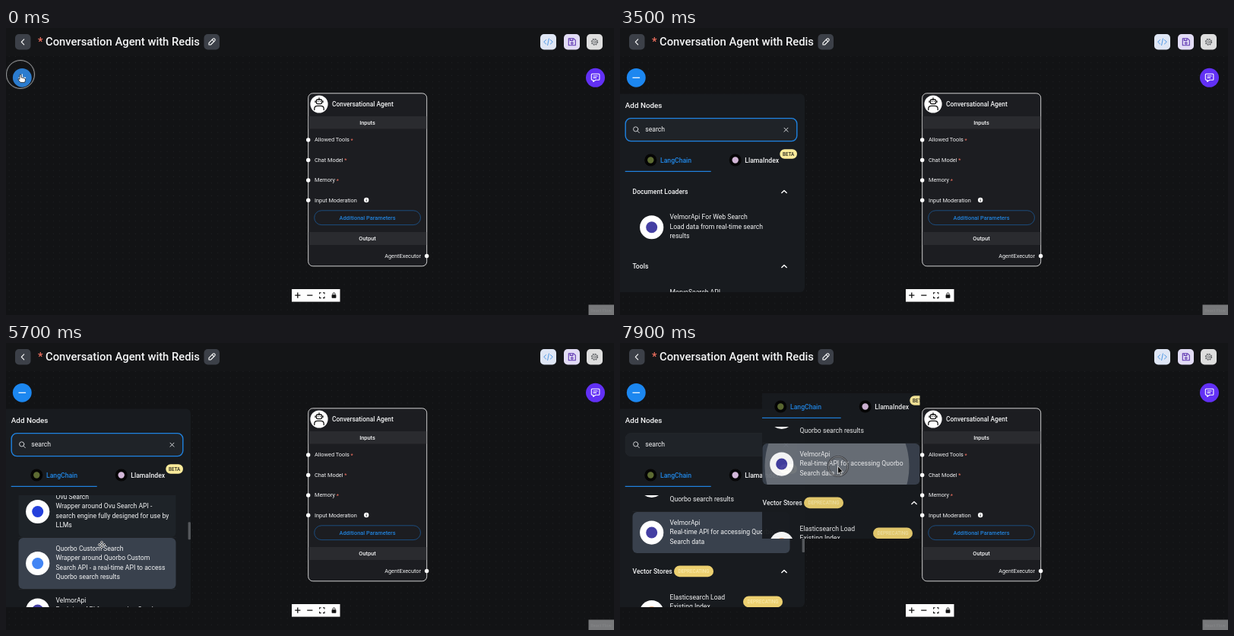
These frames come from a looping animation (800 by 377 pixels, 8000 ms). An HTML page:

```html
<!DOCTYPE html>
<html lang="en">
<head>
<meta charset="utf-8">
<title>Add a search tool to the agent</title>
<style>
  html, body { margin: 0; width: 100%; height: 100%; overflow: hidden; background: #141517; }
  svg { display: block; width: 100vw; height: 100vh; }
  text { font: 400 8.63px Roboto, "Open Sans", sans-serif; fill: #f4f5f6; dominant-baseline: central; white-space: pre; }
  .title { font-size: 14.8px; font-weight: 500; }
  .drawer { font-size: 9.86px; font-weight: 500; }
  .head { font-weight: 500; }
  .active { font-weight: 500; fill: #2189ea; }
  .hint { fill: #85888c; }
  .name { font-size: 8.4px; font-weight: 500; }
  .port { font-size: 7.35px; }
  .sect { font-size: 7.4px; font-weight: 500; text-anchor: middle; }
  .link { fill: #2182dc; }
  .red { fill: #f0705f; }
  .beta { font-size: 6.3px; font-weight: 500; fill: #2b2a20; text-anchor: middle; }
  .chip { font-size: 6.3px; fill: #fbeeb4; text-anchor: middle; }
  .ln { fill: none; stroke: #fff; stroke-width: 1.1; stroke-linecap: round; stroke-linejoin: round; }
</style>
</head>
<body>
<svg id="stage" viewBox="0 0 800 377" preserveAspectRatio="none">
  <defs>
    <pattern id="dots" width="8.32" height="8.32" patternUnits="userSpaceOnUse">
      <circle cx="4" cy="4" r=".45" fill="#303135"/>
    </pattern>
    <clipPath id="listClip"><rect y="200" width="239" height="147"/></clipPath>
    <clipPath id="itemClip"><rect x="16.5" y="-14" width="207" height="54" rx="6"/></clipPath>
    <clipPath id="ghostClip"><rect x="16" y="156" width="207.5" height="191"/></clipPath>
  </defs>

  <rect width="800" height="377" fill="#121315"/>
  <rect y="37" width="800" height="340" fill="url(#dots)"/>
  <rect width="800" height="37" fill="#141517"/>

  <!-- header -->
  <rect x="12" y="8" width="20.5" height="20.5" rx="5" fill="#3c4048"/>
  <path class="ln" d="M23.7 14.8l-3.4 3.5 3.4 3.5"/>
  <text class="title" x="42" y="17.7"><tspan class="red">*</tspan></text>
  <text class="title" x="52" y="17.7">Conversation Agent with Redis</text>
  <rect x="260.5" y="8" width="20.5" height="20.5" rx="5" fill="#3c4048"/>
  <path class="ln" d="M267 22v-2.4l5.4-5.4q1.2-1 2.3.1t.1 2.3l-5.4 5.4zM271.3 15.4l2.4 2.4"/>
  <rect x="703" y="8" width="21" height="20.5" rx="5" fill="#dfe6f5"/>
  <path class="ln" style="stroke:#3f90e2;stroke-width:.9" d="M710.6 15.6l-2.9 2.7 2.9 2.7M716.4 15.6l2.9 2.7-2.9 2.7M714.4 14l-1.8 8.6"/>
  <rect x="734" y="8" width="21" height="20.5" rx="5" fill="#e2dcf5"/>
  <path class="ln" style="stroke:#5e35b1" d="M740.3 13.8h6.6l2.4 2.4v6.6h-9zM742.3 13.8v2.6h3.6v-2.6"/>
  <circle class="ln" style="stroke:#5e35b1" cx="744.8" cy="19.8" r="1.3"/>
  <rect x="764" y="8" width="21" height="20.5" rx="5" fill="#dedede"/>
  <circle class="ln" style="stroke:#66686b;stroke-width:1.2;stroke-linecap:butt;stroke-dasharray:1.6 1.62" cx="774.5" cy="18.3" r="4.1"/>
  <circle class="ln" style="stroke:#66686b;stroke-width:.9" cx="774.5" cy="18.3" r="3.4"/>
  <circle class="ln" style="stroke:#66686b;stroke-width:.9" cx="774.5" cy="18.3" r="1.4"/>

  <!-- chat button -->
  <circle cx="775.5" cy="65.3" r="12.5" fill="#6230f5"/>
  <path class="ln" d="M770.3 61.2q0-1 1-1h8.6q1 0 1 1v6q0 1-1 1h-4.2l-3 2.3v-2.3h-1.4q-1 0-1-1zM773 63h5.2M773 65.4h3.6"/>

  <!-- agent node -->
  <rect x="397.7" y="85.8" width="156" height="227" rx="6" fill="#1c1d21" stroke="#e4e4e4" stroke-width=".9"/>
  <circle cx="412" cy="100" r="11.6" fill="#fff"/>
  <g class="ln" style="stroke:#111;stroke-width:1.3">
    <rect x="408.4" y="94" width="7.2" height="5.6" rx="1.6"/>
    <path d="M412 92v2M407 96v1.6M417 96v1.6M405.8 107.5v-1.4q0-3.8 4-3.8h4.4q4 0 4 3.8v1.4M410.6 96.6h.1M413.4 96.6h.1"/>
  </g>
  <text class="name" x="429" y="100.2">Conversational Agent</text>
  <rect x="398.2" y="116" width="155" height="16.5" fill="#2a2b2f"/>
  <text class="sect" x="475.5" y="124">Inputs</text>
  <g id="ports"></g>
  <circle cx="474.2" cy="226" r="3.2" fill="#fff"/>
  <path d="M474.2 225.6v2.2M474.2 224v.5" stroke="#1c1d21"/>
  <rect x="405.7" y="239.8" width="139.8" height="18.8" rx="9.4" fill="none" stroke="#1c5288" stroke-width=".9"/>
  <text class="sect link" x="475.5" y="249">Additional Parameters</text>
  <rect x="398.2" y="268" width="155" height="17" fill="#2a2b2f"/>
  <text class="sect" x="475.5" y="276.7">Output</text>
  <text class="port" x="546" y="299.5" text-anchor="end">AgentExecutor</text>
  <circle cx="553.6" cy="299.5" r="2.7" fill="#fff"/>

  <!-- canvas controls -->
  <rect x="376" y="343" width="63.5" height="16.6" fill="#fefefe"/>
  <path d="M380.2 351.2h7.2M383.8 347.6v7.2M396.2 351.2h7.2" stroke="#111" stroke-width="1.3"/>
  <path d="M412.6 349.6v-1.8h2M417 347.8h2v1.8M419 352.8v1.8h-2M414.6 354.6h-2v-1.8" fill="none" stroke="#111" stroke-width="1.1"/>
  <rect x="428.6" y="350.3" width="5.8" height="4.4" rx=".6" fill="#111"/>
  <path d="M430 350.3v-1q0-1.5 1.5-1.5t1.5 1.5v1" fill="none" stroke="#111" stroke-width=".9"/>
  <rect x="766.5" y="363.5" width="33.5" height="13.5" fill="#77787a"/>
  <text x="783" y="370.5" text-anchor="middle" style="font-size:5.6px;fill:#868789">React Flow</text>

  <!-- add button -->
  <circle id="fab" cx="21.3" cy="65.3" r="12.4"/>
  <path id="fabIcon" stroke="#fff" stroke-width="1.2"/>

  <!-- node drawer -->
  <g id="panel">
    <rect x="-10" y="86.5" width="253" height="260.5" rx="6" fill="#181b1f"/>
    <text class="drawer" x="6.8" y="101.4">Add Nodes</text>
    <rect class="field" x="7.2" y="118.6" width="225.6" height="30" rx="7" fill="#1f2328"/>
    <circle class="ln" cx="20.7" cy="132.9" r="3.1" style="stroke:#c9cbce;stroke-width:1"/>
    <path class="ln" d="M23 135.3l2.4 2.4" style="stroke:#c9cbce;stroke-width:1"/>
    <text class="query" x="33.3" y="133.4"></text>
    <path class="ln" d="M216 131.2l5 5M221 131.2l-5 5" style="stroke:#d8dadc;stroke-width:1"/>
    <circle cx="40.3" cy="173.5" r="8" fill="#050505"/><circle cx="40.3" cy="173.5" r="4.2" fill="#5d6b32"/>
    <text class="active" x="53" y="174.1">LangChain</text>
    <circle cx="151.7" cy="173.5" r="8" fill="#050505"/><circle cx="151.7" cy="173.5" r="4.2" fill="#d3b7d8"/>
    <text class="head" x="164.3" y="174.1">LlamaIndex</text>
    <rect x="210.3" y="159.3" width="22.7" height="12.4" rx="6.2" fill="#fbeb9b"/>
    <text class="beta" x="221.7" y="165.6">BETA</text>
    <rect class="line" x="6.7" y="187.8" height="1.2" fill="#1f83e2"/>
    <g clip-path="url(#listClip)">
      <g class="all"></g>
      <g class="found"></g>
    </g>
    <rect class="thumb" x="239.6" width="3.4" height="23" rx="1" fill="#54575b"/>
  </g>

  <g id="ghost" opacity=".95"></g>

  <circle id="halo" fill="none" stroke="#26272a" stroke-width="2.6"/>
  <circle id="ring" fill="none" stroke="#b0b2b4" stroke-width="1"/>
  <g id="cursor">
    <path class="hand" fill="#fff" stroke="#222" stroke-width=".8" d="M-1 .5Q0-.7 1 .5V4L5 5Q7 5.4 6.6 7.5L5.6 10.6H0L-3 7Q-3.2 5.2-1.6 6L-1 6.5Z"/>
    <path class="beam" fill="none" stroke="#e8e8e8" d="M-2.2-6Q0-6 0-4.5 0-6 2.2-6M0-4.5V4.5M-2.2 6Q0 6 0 4.5 0 6 2.2 6M-1.2 1.6H1.2"/>
    <path class="arrow" fill="#0a0a0a" stroke="#fff" stroke-width=".75" d="M-.5-.5V10L1.8 8 3.3 11.4 5 10.6 3.5 7.3H6.6Z"/>
    <path class="move" fill="#0a0a0a" stroke="#fff" stroke-width=".7" d="M0-5L2-3H.6V-.6H3V-2L5 0 3 2V.6H.6V3H2L0 5-2 3H-.6V.6H-3V2L-5 0-3-2V-.6H-.6V-3H-2Z"/>
  </g>
</svg>

<script>
const LOOP = 8000, STEP = 100;
const FOCUS = 1300, RESULTS = 2700, SCROLL = 4200, PRESS = 7100, DRAG = 7300;
const GRAB = [116, 252];

const $ = (sel) => document.querySelector(sel);
const clamp = (v) => Math.max(0, Math.min(1, v));
const ramp = (t, from, to) => clamp((t - from) / (to - from));
const smooth = (p) => p * p * (3 - 2 * p);

function set(node, attrs) {
  for (const key in attrs) node.setAttribute(key, attrs[key]);
  return node;
}

function add(parent, tag, attrs, text) {
  const node = set(document.createElementNS('http://www.w3.org/2000/svg', tag), attrs);
  if (text) node.textContent = text;
  return parent.appendChild(node);
}

// Each key is [time, ...values].
function track(keys, t, ease = (p) => p) {
  let i = 0;
  while (i < keys.length - 2 && t >= keys[i + 1][0]) i++;
  const [a, b] = [keys[i], keys[i + 1]];
  const p = ease(ramp(t, a[0], b[0]));
  return a.slice(1).map((v, k) => v + (b[k + 1] - v) * p);
}

const pathKeys = [
  [0, 19, 61], [300, 19, 61], [1000, 93, 125], [1200, 100, 132], [3700, 100, 132],
  [4300, 125.5, 264], [4700, 125.5, 264], [5000, 126, 265], [6800, 126, 265],
  [7000, ...GRAB], [DRAG, ...GRAB], [7900, 287, 162]
];
const scrollKeys = [[SCROLL, 0], [4700, 64], [5700, 213], [6500, 305], [6700, 315]];
const pointer = (t) => track(pathKeys, t, smooth);
const scrollAt = (t) => track(scrollKeys, t)[0];

// Node inputs
[['Allowed Tools', 147], ['Chat Model', 173.5], ['Memory', 200], ['Input Moderation', 226.3]].forEach(([label, y], i) => {
  add($('#ports'), 'circle', { cx: 397.7, cy: y, r: 2.7, fill: '#fff' });
  const text = add($('#ports'), 'text', { class: 'port', x: 406, y: y - .2 }, label);
  if (i < 3) add(text, 'tspan', { class: 'red' }, ' *');
});

// Drawer lists
function addChip(parent, x, y) {
  add(parent, 'rect', { x, y: y - 7.4, width: 52, height: 14.6, rx: 7.3, fill: '#ecd070' });
  add(parent, 'text', { class: 'chip', x: x + 26, y }, 'DEPRECATING');
}

function addHead(parent, label, y, open) {
  add(parent, 'text', { class: 'head', x: 16.5, y: y - .2 }, label);
  const d = open ? 1.6 : -1.6;
  add(parent, 'path', { class: 'ln', style: 'stroke-width:1.4', d: `M212.8 ${y + d}L216 ${y - d}L219.2 ${y + d}` });
}

const all = $('.all'), found = $('.found');
['Agents', 'Cache', 'Chains', 'Chat Models', 'Document Loaders']
  .forEach((label, i) => addHead(all, label, 215 + 29.3 * i, false));
addHead(found, 'Document Loaders', 215, true);
addHead(found, 'Tools', 313, true);
addHead(found, 'Vector Stores', 615, true);
addChip(found, 71, 615);

const items = [
  { y: 248.7, color: '#443fa3', lines: ['VelmorApi For Web Search', 'Load data from real-time search', 'results'] },
  { y: 347, color: '#f0592b', rule: true, lines: ['MorvoSearch API', 'Wrapper around MorvoSearch API - a', 'real-time API to access Morvo search', 'results'] },
  { y: 415, color: '#2440dc', rule: true, lines: ['Ovu Search', 'Wrapper around Ovu Search API -', 'search engine fully designed for use by', 'LLMs'] },
  { y: 483, color: '#4285f4', rule: true, lines: ['Quorbo Custom Search', 'Wrapper around Quorbo Custom', 'Search API - a real-time API to access', 'Quorbo search results'] },
  { y: 551, color: '#443fa3', lines: ['VelmorApi', 'Real-time API for accessing Quorbo', 'Search data'] },
  { y: 649, color: '#f5b183', lines: ['Elasticsearch Load', 'Existing Index', 'Load existing index from', 'Elasticsearch'] }
];
const TARGET = 4;

items.forEach((item, i) => {
  item.h = item.lines.length * 12.9 + 15.4;
  const g = add(found, 'g', { transform: `translate(0 ${item.y})` });
  item.box = add(g, 'rect', { x: 16.5, y: -14, width: 207, height: item.h, rx: 6, fill: '#39414d' });
  if (i === TARGET) {
    const clip = add(g, 'g', { 'clip-path': 'url(#itemClip)' });
    item.ripple = add(clip, 'circle', { cx: GRAB[0] - 1.5, cy: GRAB[1] + 315 - item.y, fill: '#fff' });
  }
  if (item.rule) add(g, 'path', { d: `M16.5 ${item.h - 13.5}h207`, stroke: '#25292e', 'stroke-width': .6 });
  const cy = item.h / 2 - 14;
  add(g, 'circle', { cx: 41.7, cy, r: 15.6, fill: '#fff' });
  add(g, 'circle', { cx: 41.7, cy, r: 7.5, fill: item.color });
  item.lines.forEach((line, n) => add(g, 'text', { x: 65.5, y: n * 12.6 - .4 }, line));
});
addChip(found, 162, 655);

function hovered(t) {
  if (t >= DRAG) return TARGET;
  const y = pointer(t)[1];
  if (t < 3700 || y < 200) return -1;
  const at = y + scrollAt(t);
  return items.findIndex((item) => at >= item.y - 14 && at < item.y - 14 + item.h);
}

function drawDrawer(t) {
  const focused = t >= FOCUS && t < PRESS;
  const over = t >= 1000 && t < FOCUS;
  set($('#panel'), { opacity: ramp(t, 100, 400) });
  set($('#panel .field'), {
    stroke: focused ? '#1f83e2' : over ? '#f2f2f2' : '#22262b',
    'stroke-width': focused ? 1.4 : 1
  });

  const typed = 'search'.slice(0, Math.max(0, Math.floor((t - 1550) / 150)));
  const query = set($('#panel .query'), { class: typed ? 'query' : 'query hint' });
  query.textContent = typed || 'Search nodes';

  const done = t >= RESULTS, scroll = scrollAt(t);
  set($('#panel .line'), { width: done ? 113 : 111 });
  set(all, { display: done ? 'none' : 'inline' });
  set(found, { display: done ? 'inline' : 'none', transform: `translate(0 ${-scroll})` });
  set($('#panel .thumb'), { y: 200.5 + scroll / 6.13, opacity: t >= SCROLL ? 1 : 0 });

  const now = hovered(t), last = hovered(t - STEP);
  items.forEach((item, i) => set(item.box, { opacity: i === now ? 1 : i === last ? .2 : 0 }));
  set(items[TARGET].ripple, {
    r: 10 + 85 * ramp(t, PRESS, DRAG),
    opacity: t < PRESS ? 0 : .25 * (1 - ramp(t, DRAG, DRAG + 300))
  });
}

function drawPointer(t) {
  const [x, y] = pointer(t);
  const kind = t < 500 ? 'hand'
    : t >= DRAG ? 'arrow'
    : y > 118 && y < 149 ? 'beam'
    : hovered(t) >= 0 ? 'move' : 'arrow';
  const hidden = t >= 1600 && t < 3700;
  set($('#cursor'), { transform: `translate(${x} ${y})`, opacity: hidden ? 0 : 1 });
  for (const shape of $('#cursor').children) {
    set(shape, { display: shape.getAttribute('class') === kind ? 'inline' : 'none' });
  }

  // The ring holds while pressed, then grows and fades.
  let r = 12.8, opacity = 0;
  if (t >= PRESS) opacity = .6;
  else {
    const age = t < 1000 ? t + STEP : t - FOCUS;
    if (age >= 0 && age < 300) {
      r += age * .057;
      opacity = age <= 100 ? .8 : .3;
    }
  }
  for (const id of ['#halo', '#ring']) set($(id), { cx: x, cy: y, r, opacity });
}

function draw(t) {
  drawDrawer(t);
  drawPointer(t);
  const open = t >= 200;
  set($('#fab'), { fill: t < 500 ? '#2b7ccf' : '#1c87f0' });
  set($('#fabIcon'), { d: open ? 'M16.5 65.3h9.6' : 'M16.5 65.3h9.6M21.3 60.5v9.6' });
  const [x, y] = pointer(t);
  set($('#ghost'), {
    display: t >= DRAG ? 'inline' : 'none',
    transform: `translate(${x - GRAB[0]} ${y - GRAB[1]})`
  });
}

// The dragged picture is a still copy of the drawer at the moment of the drag.
drawDrawer(DRAG);
const copy = $('#panel').cloneNode(true);
copy.removeAttribute('id');
add($('#ghost'), 'g', { 'clip-path': 'url(#ghostClip)' }).append(copy);

const start = performance.now();
function frame() {
  const t = (performance.now() - start) % LOOP;
  draw(Math.floor(t / STEP) * STEP);
  requestAnimationFrame(frame);
}
frame();
</script>
</body>
</html>
```
